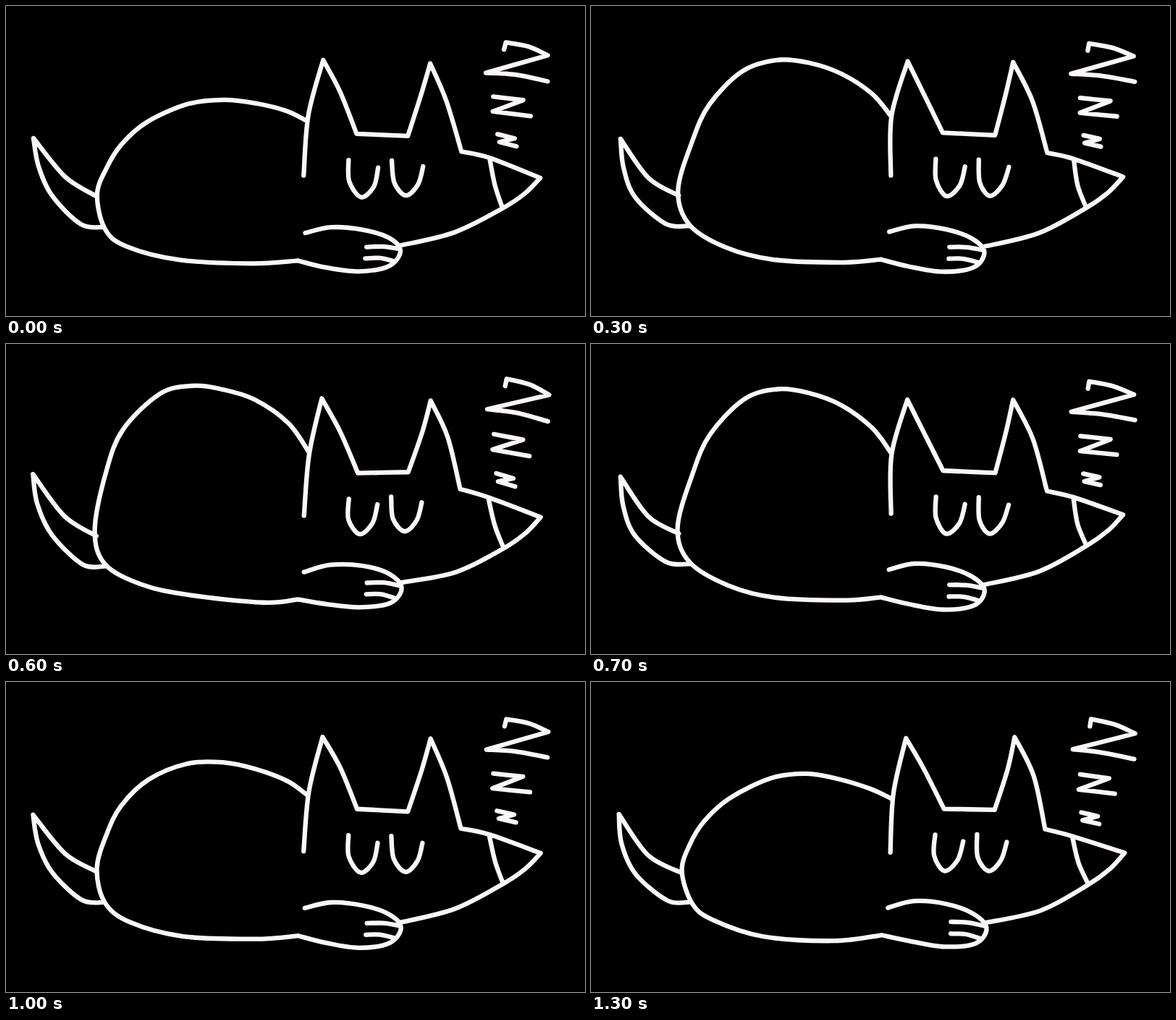
Animation, 800 px wide and 429 px high, one loop 1400 ms. Source, as an HTML page:

```html
<!DOCTYPE html>
<html lang="en">
<head>
<meta charset="utf-8">
<title>Sleeping dog</title>
<style>
  html, body { margin: 0; width: 100%; height: 100%; overflow: hidden; background: #000; }
  svg { display: block; width: 100%; height: 100%; }
  path { fill: none; stroke: #fcf6f6; stroke-width: 6.3; stroke-linecap: round; stroke-linejoin: round; }
</style>
</head>
<body>
<svg viewBox="0 0 800 429"><path id="line"/></svg>
<script>
const STEP = 100, STEPS = 14, WOBBLE = 1.8;

// A stroke is a smooth curve through its points; "/" marks a sharp corner.
const stroke = text => text.split('/').map(part =>
  part.split(' ').map(p => p.split(',').map(Number)));

const bodyOut = stroke('414,160 386,146 345,134 300,128 250,135 193,162 158,193 137,226 125,262 138,308 168,331 240,351 338,358 402,352');
const bodyIn = stroke('417,150 390,111 345,78 300,62 257,56 212,68 163,118 140,175 121,255 136,303 190,334 255,349 355,356 402,352');

const tail = '136,306 104,303 62,264 44,222 39,182/80,238 123,264';
const head = '413,236 417,153 437,76/460,120 486,177/557,178/574,122 585,78/610,130 629,202/667,212 737,238/716,260 686,281 620,315 542,332';
const nose = '667,214 674,250 686,281';
const eyes = ['475,213 475,242 490,263 508,248 515,222', '534,212 536,243 551,261 568,246 576,221'];
const paw = '412,314 448,305 492,308 528,320 545,339 530,360 487,366 440,360 402,352';
const toes = ['497,332 520,332 542,336', '496,348 516,348 535,353'];
const snores = [
  '688,60 690,50/722,57 750,70/664,92/705,96 750,106',
  '675,126 716,132/674,147/725,154',
  '679,179 702,185/681,190/704,196'
];
const still = [tail, head, nose, ...eyes, paw, ...toes, ...snores].map(stroke);

const clamp = v => Math.min(1, Math.max(0, v));
const mix = (a, b, k) => Array.isArray(a) ? a.map((v, i) => mix(v, b[i], k)) : a + (b - a) * k;

// 0 = lungs empty, 1 = full: in over steps 1 to 4, out over steps 6 to 11
function breath(step) {
  const rise = clamp((step - 1) / 3), fall = clamp((step - 6) / 5);
  return rise * rise * (3 - 2 * rise) - fall ** 1.4;
}

let seed = 7;
const random = () => (seed = seed * 16807 % 2147483647) / 2147483647;

// Each drawing bends the plane a little differently, so that joints stay closed.
function makeWobble() {
  const a = random() * 2 * Math.PI, b = random() * 2 * Math.PI;
  return ([x, y]) => [
    x + WOBBLE * Math.sin(y / 35 + x / 90 + a),
    y + WOBBLE * Math.sin(x / 45 + y / 80 + b)
  ];
}

// Catmull-Rom spline as cubic Béziers
function curve(pts) {
  let d = '';
  for (let i = 0; i < pts.length - 1; i++) {
    const p = pts[i], q = pts[i + 1];
    const before = pts[i - 1] || p, after = pts[i + 2] || q;
    const c1 = p.map((v, j) => v + (q[j] - before[j]) / 6);
    const c2 = q.map((v, j) => v - (after[j] - p[j]) / 6);
    d += `C${c1} ${c2} ${q}`;
  }
  return d;
}

const strokePath = parts => 'M' + parts[0][0] + parts.map((pts, i) =>
  curve(i ? [parts[i - 1].at(-1), ...pts] : pts)).join('');

function drawing(step) {
  const wobble = makeWobble();
  return [mix(bodyOut, bodyIn, breath(step)), ...still]
    .map(parts => strokePath(parts.map(pts => pts.map(wobble)))).join('');
}

const drawings = Array.from({ length: STEPS }, (_, i) => drawing(i));
const line = document.getElementById('line');

function tick() {
  line.setAttribute('d', drawings[Math.floor(performance.now() / STEP) % STEPS]);
  requestAnimationFrame(tick);
}
tick();
</script>
</body>
</html>
```
